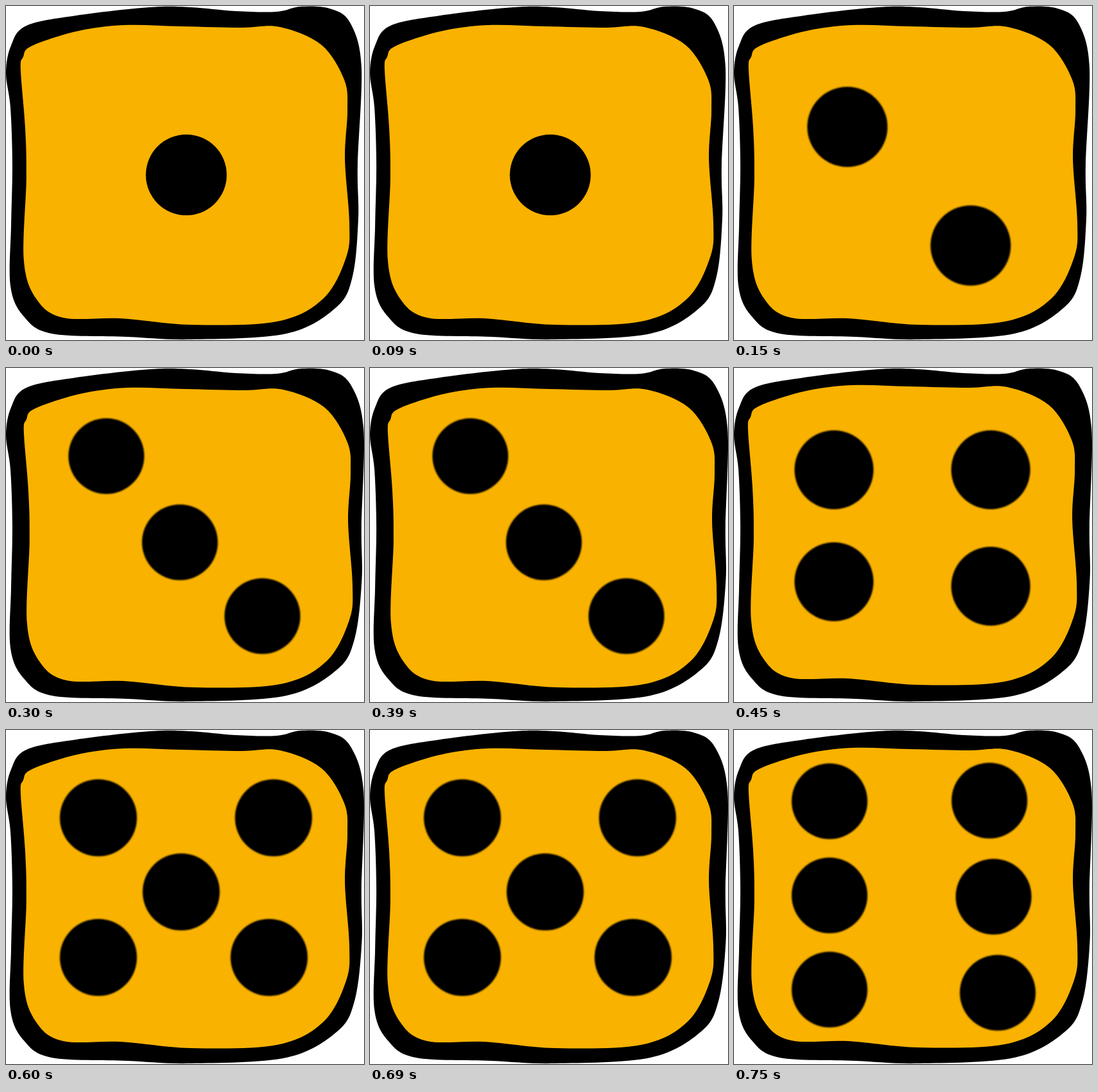
Animation of 562x525 px, one loop 0.9 s. Source, as an HTML page with a canvas:

```html
<!DOCTYPE html>
<html lang="en">
<head>
<meta charset="utf-8">
<title>Rolling die</title>
<style>
  html, body { margin: 0; width: 100%; height: 100%; overflow: hidden; background: #fff; }
  canvas { display: block; }
</style>
</head>
<body>
<canvas id="stage" width="562" height="525"></canvas>
<script>
const canvas = document.getElementById('stage');
const ctx = canvas.getContext('2d');
const { width, height } = canvas;
const FACE_MS = 150;

// Key points of the hand-drawn shapes, clockwise from the upper left.
const outline = [
  [0, 105], [8, 62], [32, 31], [110, 15], [225, 2], [290, 2], [360, 8], [425, 9],
  [462, 1], [508, 4], [540, 26], [558, 95], [552, 250], [553, 335], [544, 425],
  [518, 474], [440, 515], [290, 524], [190, 520], [72, 515], [28, 488], [7, 440],
  [8, 345], [10, 250], [7, 160]
];
const panel = [
  [23, 100], [27, 80], [40, 63], [110, 40], [185, 30], [275, 32], [370, 34], [430, 33],
  [495, 61], [531, 116], [536, 165], [532, 240], [539, 340], [534, 395], [498, 460],
  [425, 496], [290, 501], [180, 491], [90, 490], [48, 461], [28, 400], [32, 270], [30, 190]
];

// Lines run from the first to the last dot; odd faces also have a centre dot.
const faces = [
  { r: 63.5, lines: [], centre: [283, 265.5] },
  { r: 63, lines: [[178, 190, 371.5, 376.5]] },
  { r: 59.5, lines: [[157.5, 138.5, 402.5, 390]], centre: [273, 274], shift: [5, 1], bulge: 6 },
  { r: 62, lines: [[157, 160, 157, 336], [403, 160, 403, 343]], shift: [-1, -3], bulge: 6 },
  { r: 60.5, lines: [[145, 138, 145, 357.5], [420, 138, 413, 357.5]], centre: [275, 254.5],
    shift: [0, -1], bulge: 6 },
  { r: 59.5, lines: [[150, 112, 150, 408], [401, 111, 414, 413]], shift: [0, -2], bulge: 6 }
];

// Closed Catmull-Rom curve through the points.
function smoothPath(points) {
  const path = new Path2D();
  const at = i => points[(i + points.length) % points.length];
  path.moveTo(...points[0]);
  points.forEach((p, i) => {
    const before = at(i - 1), q = at(i + 1), after = at(i + 2);
    path.bezierCurveTo(
      p[0] + (q[0] - before[0]) / 6, p[1] + (q[1] - before[1]) / 6,
      q[0] - (after[0] - p[0]) / 6, q[1] - (after[1] - p[1]) / 6,
      q[0], q[1]);
  });
  path.closePath();
  return path;
}

// Pushes the right edge outwards, most at mid-height.
function bulgeRight(points, amount) {
  return points.map(([x, y]) =>
    [x > 500 ? x + amount * Math.sin(Math.PI * y / height) : x, y]);
}

function dotPositions({ lines, centre }, count) {
  const perLine = Math.floor(count / (lines.length || 1)) - (centre && lines.length === 1 ? 1 : 0);
  const dots = centre ? [centre] : [];
  for (const [x1, y1, x2, y2] of lines) {
    for (let i = 0; i < perLine; i++) {
      const k = i / (perLine - 1);
      dots.push([x1 + (x2 - x1) * k, y1 + (y2 - y1) * k]);
    }
  }
  return dots;
}

function fillPath(path, color, [dx, dy] = [0, 0]) {
  ctx.save();
  ctx.translate(dx, dy);
  ctx.fillStyle = color;
  ctx.fill(path);
  ctx.restore();
}

const panelPath = smoothPath(panel);

function drawFace(count) {
  const face = faces[count - 1];
  ctx.clearRect(0, 0, width, height);
  fillPath(smoothPath(bulgeRight(outline, face.bulge || 0)), '#000');
  fillPath(panelPath, '#f9b200', face.shift);

  // All dots but the single one have slightly soft edges.
  ctx.filter = count > 1 ? 'blur(1px)' : 'none';
  for (const [x, y] of dotPositions(face, count)) {
    const dot = new Path2D();
    dot.arc(x, y, face.r, 0, Math.PI * 2);
    fillPath(dot, '#000');
  }
  ctx.filter = 'none';
}

const start = performance.now();
function tick() {
  const elapsed = performance.now() - start;
  drawFace(Math.floor(elapsed / FACE_MS) % faces.length + 1);
  requestAnimationFrame(tick);
}
tick();
</script>
</body>
</html>
```
